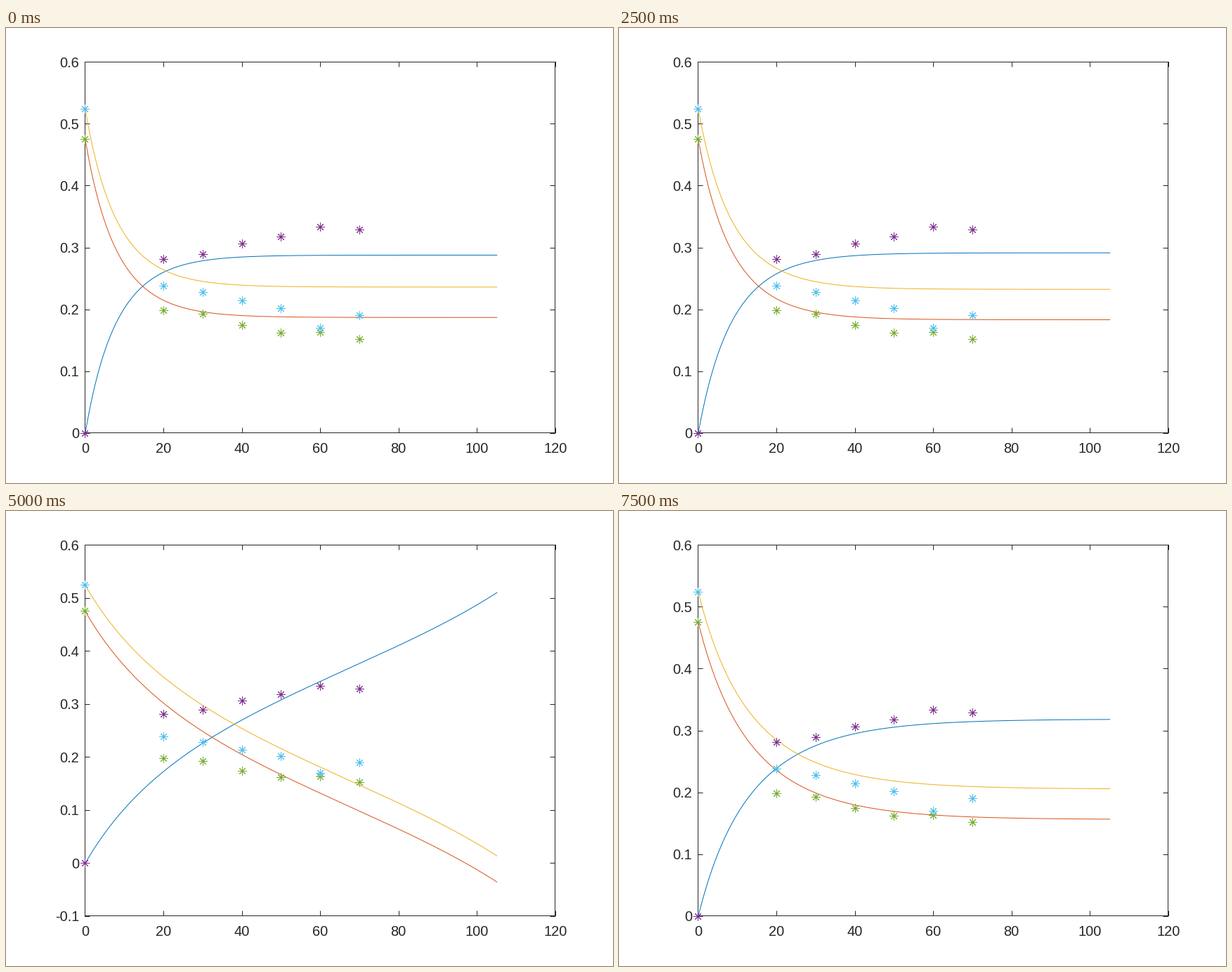
These frames come from a looping animation (864 px wide and 648 px high, 8 s). A matplotlib script:

```python
import numpy as np
import matplotlib.pyplot as plt
from matplotlib.animation import FuncAnimation
from matplotlib.transforms import Affine2D

plt.rcParams.update({
    "font.family": "Liberation Sans",
    "font.size": 10,
    "axes.unicode_minus": False,
    "axes.linewidth": 0.5,
})

WIDTH, HEIGHT, DPI = 864, 648, 144
FRAMES = 16
INK = "#262626"

A0 = 0.5246        # starting fractions of the two reactants
B0 = 1 - A0
GAP = 0.07         # forward minus backward rate, constant during the fit

# Forward rates tried by the fit. Each accepted trial is evaluated three
# times; one with a negative backward rate is rejected after a single look.
trials = [0.15, 0.1405, 0.1285, 0.0516, 0.0935, 0.1024]
steps = trials[:1] + [k for k in trials for _ in range(3 if k > GAP else 1)]

t = np.linspace(0, 105, 400)


def product(kf):
    """Solve x' = kf (A0 - x)(B0 - x) - (kf - GAP) x^2 with x(0) = 0."""
    a = kf * A0 * B0
    w = np.sqrt(complex(kf ** 2 - 4 * GAP * a))
    th = np.tanh(w * t / 2)
    return (2 * a * th / (w + kf * th)).real


fig = plt.figure(figsize=(WIDTH / DPI, HEIGHT / DPI), dpi=DPI,
                 facecolor="white")
ax = fig.add_axes([0.13, 0.11 + 0.15 / HEIGHT, 0.775, 0.815])
ax.set_xlim(0, 120)
ax.set_xticks(range(0, 121, 20))
ax.yaxis.set_major_formatter(lambda v, _: f"{round(v, 1):g}")
for name, spine in ax.spines.items():
    spine.set_color(INK)
    if name in ("bottom", "right"):
        spine.set_position(("outward", -0.25))
ax.tick_params(direction="in", top=True, right=True, length=3.3, width=0.5,
               color=INK, labelcolor=INK)
ax.tick_params(axis="x", pad=7)
ax.tick_params(axis="y", pad=4)

# Curves sit on pixel centres
centred = ax.transData + Affine2D().translate(0.5, -0.5)
curves = [ax.plot([], [], color=c, lw=0.5, zorder=3, transform=centred)[0]
          for c in ("#0072BD", "#D95319", "#EDB120")]

# Measured reactants; the product follows from the mass balance
times = np.array([0, *range(20, 71, 10)])
a = np.array([A0, 0.2383, 0.2282, 0.2138, 0.2022, 0.1697, 0.1902])
b = np.array([B0, 0.1981, 0.1924, 0.1743, 0.1624, 0.1630, 0.1522])
for y, color in (((1 - a - b) / 2, "#7E2F8E"), (b, "#77AC30"), (a, "#4DBEEE")):
    ax.plot(times, y, ls="none", marker=(8, 2, 0), ms=6, mew=0.5,
            color=color, clip_on=False, zorder=4)


def update(i):
    x = product(steps[i])
    for line, y in zip(curves, (x, B0 - x, A0 - x)):
        line.set_data(t, y)
    low = -1 if x.max() > B0 else 0
    ax.set_ylim(low / 10, 0.6)
    ax.set_yticks(np.arange(low, 7) / 10)
    return curves


anim = FuncAnimation(fig, update, frames=FRAMES, interval=500,
                     repeat=True, repeat_delay=0, blit=False)
plt.show()
```
